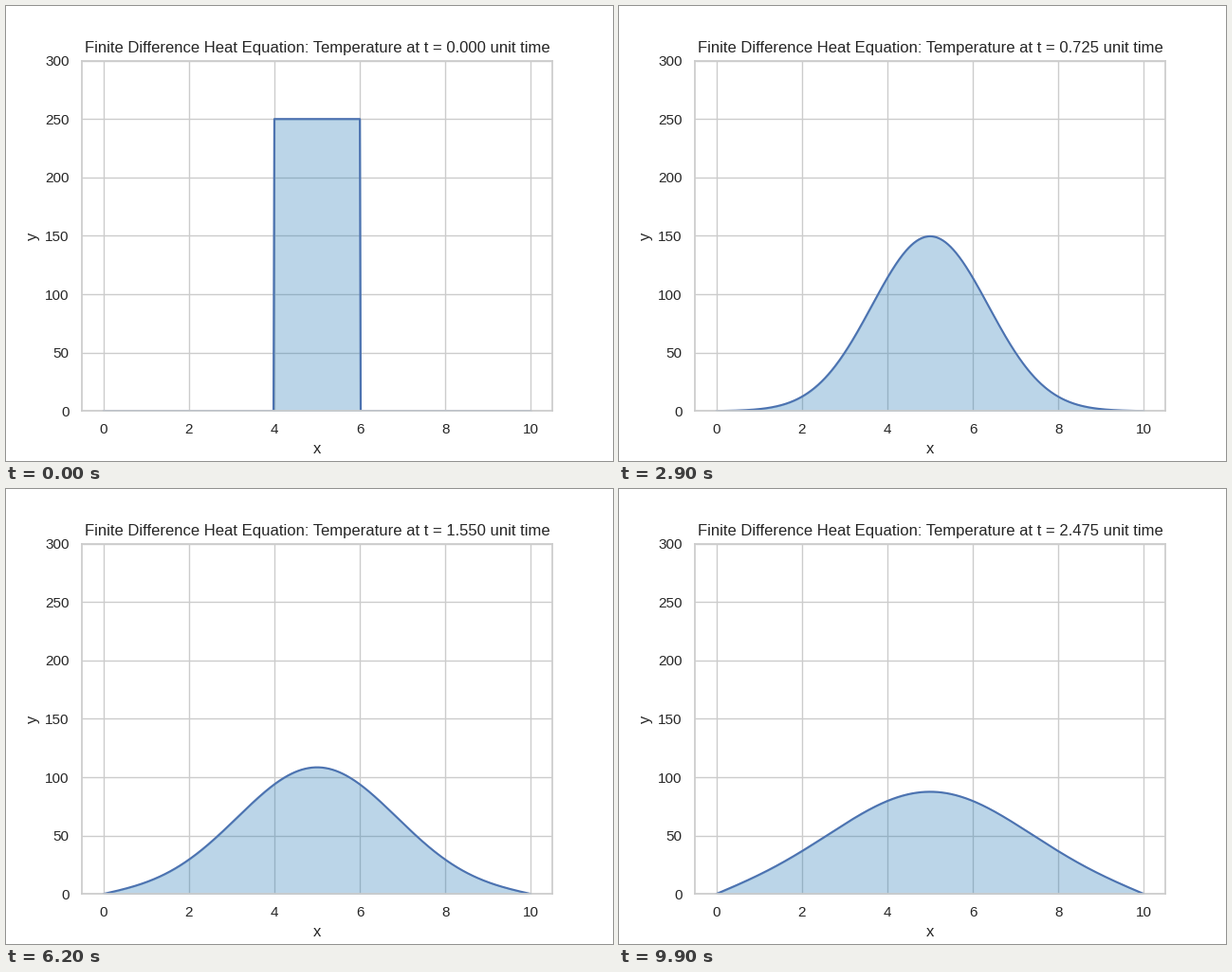
These frames come from a looping animation (640x480 px, 10000 ms). A matplotlib script:

```python
import numpy as np
import matplotlib.pyplot as plt
from matplotlib.animation import FuncAnimation

FRAMES = 100
INTERVAL = 100          # ms
FRAME_TIME = 0.025      # simulated time per frame
LENGTH = 10
DX = 0.02
DT = 0.0001
STEPS = round(FRAME_TIME / DT)

plt.rcParams.update({
    "font.family": "Liberation Sans",
    "font.size": 12,
    "axes.titlesize": 12,
    "axes.labelsize": 12,
    "xtick.labelsize": 11,
    "ytick.labelsize": 11,
    "text.color": ".15",
    "axes.labelcolor": ".15",
    "xtick.color": ".15",
    "ytick.color": ".15",
    "axes.edgecolor": ".8",
    "axes.linewidth": 1.25,
    "axes.axisbelow": True,
    "axes.grid": True,
    "grid.color": ".8",
    "grid.linestyle": "-",
    "grid.linewidth": 1,
    "lines.linewidth": 1.5,
    "lines.solid_capstyle": "round",
    "patch.linewidth": 1,
    "xtick.bottom": False,
    "ytick.left": False,
    "xtick.major.size": 6,
    "ytick.major.size": 6,
})


def solve(x):
    """Explicit finite differences with both ends held at zero."""
    u = np.where(np.abs(x - LENGTH / 2) <= 1 + 1e-9, 250.0, 0.0)
    r = DT / DX**2
    history = [u.copy()]
    for _ in range(FRAMES - 1):
        for _ in range(STEPS):
            u[1:-1] += r * (u[2:] - 2 * u[1:-1] + u[:-2])
        history.append(u.copy())
    return history


x = np.linspace(0, LENGTH, round(LENGTH / DX) + 1)
history = solve(x)

fig, ax = plt.subplots(figsize=(6.4, 4.8), dpi=100)


def draw(i):
    u = history[i]
    ax.clear()
    ax.plot(x, u, color="#4c72b0")
    ax.fill_between(x, u, color="tab:blue", alpha=0.3)
    ax.set(xlim=(-0.5, 10.5), ylim=(0, 300), xlabel="x", ylabel="y")
    ax.set_title("Finite Difference Heat Equation: "
                 f"Temperature at t = {i * FRAME_TIME:.3f} unit time")


anim = FuncAnimation(fig, draw, frames=FRAMES, interval=INTERVAL,
                     init_func=lambda: draw(0), repeat=True, repeat_delay=0)
plt.show()
```
